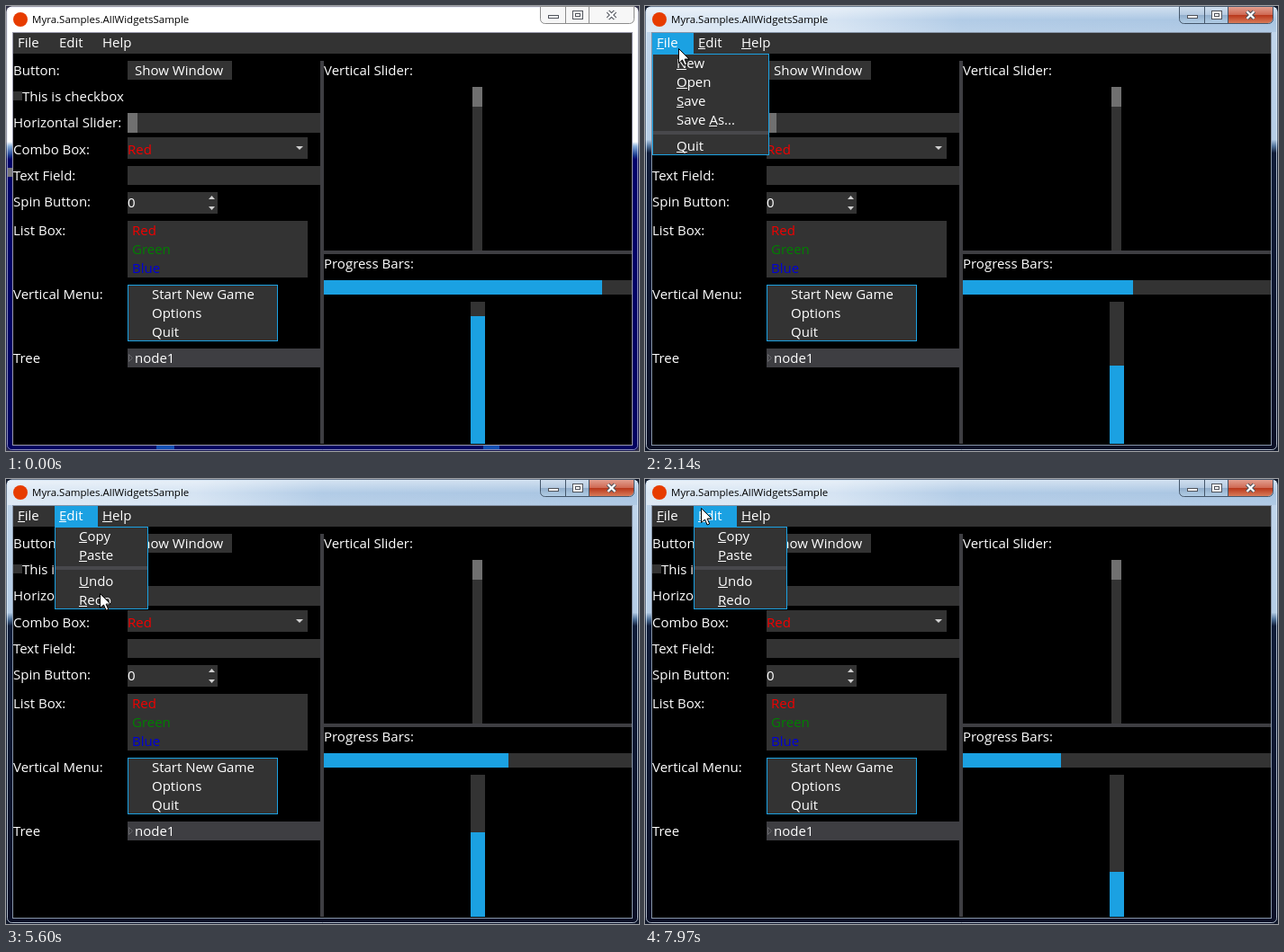
An HTML page with a canvas that plays this animation: 703x495 px, repeating every 8 s.

```html
<!DOCTYPE html>
<html lang="en">
<head>
<meta charset="utf-8">
<title>Widgets</title>
<style>
  html, body { margin: 0; width: 100%; height: 100%; overflow: hidden; background: #000; }
  canvas { display: block; }
</style>
</head>
<body>
<canvas id="stage" width="703" height="495"></canvas>
<script>
const ctx = document.getElementById('stage').getContext('2d');
const W = 703, H = 495, LOOP = 8000, STEP = 76.76;
const PANEL = '#333333', LIGHT = '#3e3e42', BLUE = '#1ba1e2', THUMB = '#707070';
const FONT = '15px "Open Sans", sans-serif';

// Progress in bar pixels, unwrapped: [tick, px]
const BAR = 342;
const PROGRESS = [[0, 309], [20, 466.2], [28, 531.2], [47, 682.2], [73, 889.2], [90, 1025.9], [104, 1135.2]];

// Pointer path: [tick, x, y]
const PATH = [
  [6, 130, 420], [11, 24, 55], [14, 27, 37], [22, 27, 37], [25, 37, 47],
  [32, 37, 47], [33, 56, 96], [36, 52, 97], [50, 52, 97], [55, 120, 80],
  [60, 130, 90], [66, 100, 65], [69, 75, 39], [70, 77, 42], [73, 104, 127],
  [78, 104, 127], [82, 125, 100], [87, 103, 42], [89, 90, 42], [93, 90, 42], [102, 62, 32]
];

const ACTIVE_AT = 21, MENU_AT = 22;
const MENUS = [
  { name: '&File', x: 8, w: 46, tx: 13, drop: 130, h: 113, sep: 139, open: [[22, 50]],
    items: [['&New', 54], ['&Open', 75], ['&Save', 96], ['Save &As...', 117], ['&Quit', 146]] },
  { name: '&Edit', x: 54, w: 48, tx: 59, drop: 104, h: 92, sep: 97, open: [[69, 76], [89, 999]],
    items: [['&Copy', 54], ['&Paste', 75], ['&Undo', 104], ['&Redo', 125]] },
  { name: '&Help', x: 102, w: 42, tx: 107, open: [] }
];

function follow(keys, n) {
  let i = 0;
  while (i < keys.length - 2 && n >= keys[i + 1][0]) i++;
  const a = keys[i], b = keys[i + 1];
  const k = Math.min(1, Math.max(0, (n - a[0]) / (b[0] - a[0])));
  return a.slice(1).map((v, j) => v + (b[j + 1] - v) * k);
}

function rect(x, y, w, h, fill) {
  ctx.fillStyle = fill;
  ctx.fillRect(x, y, w, h);
}

function frame(x, y, w, h, line) {
  ctx.strokeStyle = line;
  ctx.lineWidth = 1;
  ctx.strokeRect(x + .5, y + .5, w - 1, h - 1);
}

function poly(points, fill, line) {
  ctx.beginPath();
  points.forEach(([x, y]) => ctx.lineTo(x, y));
  ctx.closePath();
  if (fill) { ctx.fillStyle = fill; ctx.fill(); }
  if (line) { ctx.strokeStyle = line; ctx.lineWidth = 1; ctx.stroke(); }
}

function text(s, x, y, color = '#fff', font = FONT) {
  ctx.font = font;
  ctx.fillStyle = color;
  ctx.fillText(s, x, y);
}

// '&' marks the access key
function label(s, x, y, underline) {
  const at = s.indexOf('&'), plain = s.replace('&', '');
  text(plain, x, y);
  if (!underline) return;
  const left = ctx.measureText(plain.slice(0, at)).width;
  rect(Math.round(x + left), y + 1, Math.round(ctx.measureText(plain[at]).width), 1, '#fff');
}

function gradient(x0, y0, x1, y1, stops) {
  const g = ctx.createLinearGradient(x0, y0, x1, y1);
  stops.forEach(([p, c]) => g.addColorStop(p, c));
  return g;
}

function bottomRound(x, y, w, h, l, r) {
  ctx.beginPath();
  ctx.roundRect(x, y, w, h, [0, 0, r, l]);
}

function captionButtons(active) {
  const dark = active ? '#45576b' : '#8c8c8c';
  bottomRound(593.5, .5, 104, 19, 5, 5);
  ctx.fillStyle = active
    ? gradient(0, 0, 0, 20, [[0, '#d3e1f0'], [.48, '#b5cae1'], [.5, '#92aecb'], [1, '#b4d0e8']])
    : '#f7f7f7';
  ctx.fill();
  if (active) {
    bottomRound(648, 0, 49, 19, 0, 5);
    ctx.fillStyle = gradient(0, 0, 0, 20, [[0, '#e5a596'], [.48, '#cf6a54'], [.5, '#b83519'], [1, '#dc8360']]);
    ctx.fill();
  }
  bottomRound(593.5, .5, 104, 19, 5, 5);
  ctx.strokeStyle = dark;
  ctx.lineWidth = 1;
  ctx.stroke();
  rect(621, 1, 1, 18, dark);
  rect(647, 1, 1, 18, dark);

  const edge = '#50545c';
  rect(602, 10, 12, 4, '#fff');
  frame(602, 10, 12, 4, edge);
  rect(629, 5, 12, 10, '#fff');
  frame(629, 5, 12, 10, edge);
  frame(632, 8, 6, 4, edge);
  for (const [color, width] of [[edge, 4.5], ['#fff', 2.3]]) {
    ctx.strokeStyle = color;
    ctx.lineWidth = width;
    ctx.beginPath();
    ctx.moveTo(668.5, 6); ctx.lineTo(676.5, 14);
    ctx.moveTo(676.5, 6); ctx.lineTo(668.5, 14);
    ctx.stroke();
  }
}

function windowFrame(active) {
  rect(0, 0, W, H, active ? '#10182a' : '#303048');
  ctx.beginPath();
  ctx.roundRect(.5, .5, W - 1, H - 1, 6);
  ctx.fillStyle = active
    ? gradient(0, 0, 0, H, [[0, '#c3d7ec'], [.3, '#b5cde6'], [.315, '#50729a'], [.33, '#101c38'], [1, '#0b1026']])
    : gradient(0, 0, 0, H, [[0, '#fff'], [.305, '#fff'], [.315, '#8ab0dc'], [.335, '#1c3c90'], [.345, '#00006a'], [1, '#000060']]);
  ctx.fill();
  if (active) {
    rect(2, 2, W - 4, 27, gradient(0, 0, W, 0, [[0, '#d9e6f3'], [.3, '#d3e2f2'], [.5, '#aec9e5'], [1, '#a3c1e0']]));
    rect(2, 2, W - 4, 27, gradient(0, 2, 0, 29, [[0, 'rgba(255,255,255,.45)'], [.5, 'rgba(255,255,255,.05)'], [1, 'rgba(255,255,255,.15)']]));
  } else {
    rect(2, 180, 5, 10, '#77777c');
    rect(167, 489, 20, 4, '#1450b4');
    rect(530, 489, 18, 4, '#1450b4');
  }
  ctx.beginPath();
  ctx.roundRect(1.5, 1.5, W - 3, H - 3, 5);
  ctx.strokeStyle = active ? 'rgba(225,238,250,.75)' : 'rgba(225,230,245,.6)';
  ctx.lineWidth = 1;
  ctx.stroke();
  frame(7, 29, 689, 460, active ? '#8795a8' : '#9a9aac');

  ctx.beginPath();
  ctx.arc(16, 15, 8, 0, Math.PI * 2);
  ctx.fillStyle = '#e73c00';
  ctx.fill();
  text('Myra.Samples.AllWidgetsSample', 29, 19, '#000', '11.5px "Open Sans", sans-serif');
  captionButtons(active);
}

function widgets() {
  rect(8, 30, 687, 458, '#000');
  [['Button:', 77], ['Horizontal Slider:', 135], ['Combo Box:', 165], ['Text Field:', 194],
   ['Spin Button:', 223], ['List Box:', 255], ['Vertical Menu:', 326], ['Tree', 397]]
    .forEach(([s, y]) => text(s, 8, y));

  rect(135, 61, 116, 21, PANEL);
  text('Show Window', 143, 77);
  rect(8, 95, 10, 10, PANEL);
  text('This is checkbox', 18, 106);
  rect(135, 119, 214, 22, PANEL);
  rect(135, 119, 11, 22, THUMB);

  rect(135, 146, 200, 24, PANEL);
  text('Red', 135, 165, '#f00000');
  poly([[322, 156], [330, 156], [326, 160]], '#d0d0d0');
  rect(135, 178, 214, 21, PANEL);
  rect(135, 207, 100, 24, PANEL);
  text('0', 135, 224);
  poly([[225, 215], [232, 215], [228.5, 211]], '#d0d0d0');
  poly([[225, 223], [232, 223], [228.5, 227]], '#d0d0d0');

  rect(135, 239, 200, 63, PANEL);
  [['Red', '#f00000'], ['Green', '#008000'], ['Blue', '#0000d8']]
    .forEach(([s, c], i) => text(s, 140, 255 + 21 * i, c));

  rect(135, 310, 167, 63, PANEL);
  frame(135, 310, 167, 63, BLUE);
  ['Start New Game', 'Options', 'Quit'].forEach((s, i) => text(s, 162, 326 + 21 * i));

  rect(135, 381, 214, 21, LIGHT);
  poly([[136.5, 387.5], [140.5, 391.5], [136.5, 395.5]], null, '#66666a');
  text('node1', 143, 397);

  rect(349, 61, 4, 426, LIGHT);
  rect(353, 272, 342, 4, LIGHT);
  text('Vertical Slider:', 353, 77);
  rect(518, 90, 11, 182, PANEL);
  rect(518, 90, 11, 22, THUMB);
  text('Progress Bars:', 353, 292);
}

function progress(n) {
  const px = follow(PROGRESS, n)[0] % BAR;
  const high = Math.floor(px / BAR * 158 + .05);
  rect(353, 305, BAR, 16, PANEL);
  rect(353, 305, Math.round(px), 16, BLUE);
  rect(516, 329, 16, 158, PANEL);
  rect(516, 487 - high, 16, high, BLUE);
}

function menus(n) {
  const [mx, my] = n > 6 ? follow(PATH, n - 1) : [-1, -1];
  const keys = n >= MENU_AT;
  rect(8, 30, 687, 23, PANEL);
  for (const m of MENUS) {
    const open = m.open.some(([a, b]) => n >= a && n < b);
    const over = mx >= m.x && mx < m.x + m.w && my >= 30 && my < 53;
    if (open || over) rect(m.x, 30, m.w, 23, open ? BLUE : LIGHT);
    label(m.name, m.tx, 46, keys);
    if (!open) continue;
    rect(m.x, 53, m.drop, m.h, PANEL);
    rect(m.x + 1, m.sep, m.drop - 2, 4, '#48484c');
    for (const [s, y] of m.items) {
      const hover = mx > m.x && mx < m.x + m.drop && my >= y && my < y + 21;
      if (hover) rect(m.x + 1, y - 1, m.drop - 2, 21, LIGHT);
      label(s, m.x + 27, y + 15, true);
    }
    frame(m.x, 53, m.drop, m.h, BLUE);
  }
}

function pointer(n) {
  if (n < 6) return;
  const [x, y] = follow(PATH, n).map(Math.round);
  const shape = [[0, 0], [0, 16], [4, 12.5], [6.6, 18.5], [9.2, 17.4], [6.6, 11.6], [11.5, 11.6]];
  poly(shape.map(([a, b]) => [x + a + .5, y + b + .5]), '#fff', '#000');
}

function draw(now) {
  const n = Math.floor((now % LOOP + 14.5) / STEP);
  windowFrame(n >= ACTIVE_AT);
  widgets();
  progress(n);
  menus(n);
  pointer(n);
}

const start = performance.now();
function tick() {
  draw(performance.now() - start);
  requestAnimationFrame(tick);
}
tick();
</script>
</body>
</html>
```
